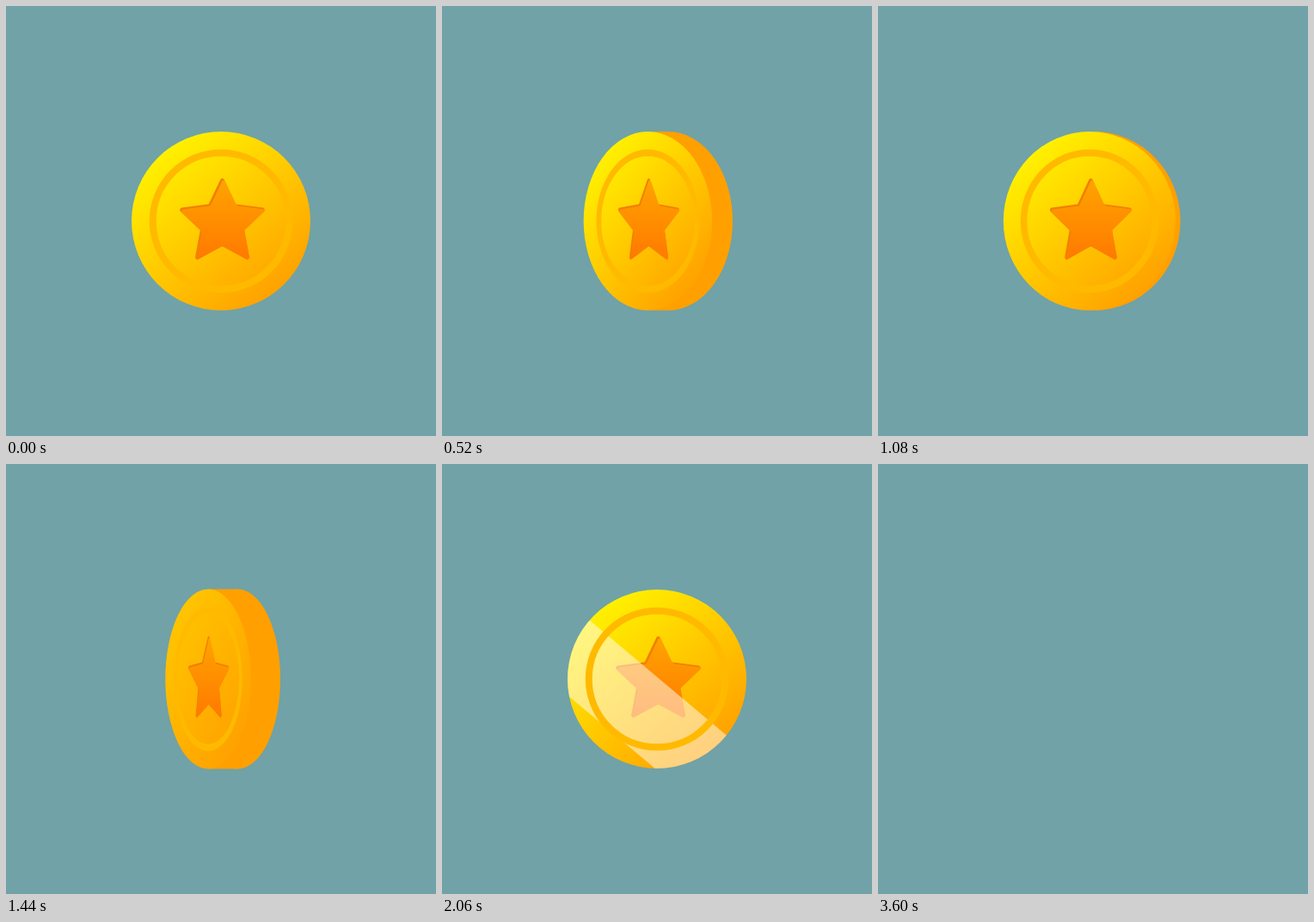
Recreate the animation shown at these times as an HTML page with a canvas. Size 500 by 500 pixels, loop 3.62 s.

```html
<!DOCTYPE html>
<html lang="en">
<head>
<meta charset="utf-8">
<title>Spinning coin</title>
<style>
  html, body { margin: 0; width: 100%; height: 100%; overflow: hidden; background: #70a2a7; }
  canvas { display: block; width: 500px; height: 500px; }
</style>
</head>
<body>
<canvas id="stage" width="500" height="500"></canvas>
<script>
const ctx = document.getElementById('stage').getContext('2d');
const LOOP = 3620, STEP = 20, HIDE = 3600;
const SPIN = 1760, RAMP = 310, TURN = 540;
const SHINE_START = 1900, SHINE_END = 2340, SHINE_WIDTH = 83;
const R = 104, CENTER = 250;
const RING = '#ffba00', EDGE = '#ffa000';

const clamp = v => Math.min(1, Math.max(0, v));

// Constant spin speed with an even ramp up and down
function turnAt(t) {
  if (t >= SPIN) return TURN;
  const speed = TURN / (SPIN - RAMP);
  if (t < RAMP) return speed * t * t / (2 * RAMP);
  const left = SPIN - t;
  if (left < RAMP) return TURN - speed * left * left / (2 * RAMP);
  return speed * (t - RAMP / 2);
}

function gradient(x0, y0, x1, y1, from, to) {
  const g = ctx.createLinearGradient(x0, y0, x1, y1);
  g.addColorStop(0, from);
  g.addColorStop(1, to);
  return g;
}

function makeStar(cx, cy, outer, inner, round) {
  const path = new Path2D();
  const at = i => {
    const a = i * Math.PI / 5 - Math.PI / 2, r = i % 2 ? inner : outer;
    return [cx + r * Math.cos(a), cy + r * Math.sin(a)];
  };
  const [ax, ay] = at(0), [bx, by] = at(1);
  path.moveTo((ax + bx) / 2, (ay + by) / 2);
  for (let i = 1; i <= 10; i++) {
    path.arcTo(...at(i), ...at(i + 1), i % 2 ? 1 : round);
  }
  path.closePath();
  return path;
}

const star = makeStar(1.5, 2.3, 55, 27, 2.5);
const starFill = gradient(0, -50, 0, 45, '#ffa400', '#ff7800');

function disc(x, rx, ry) {
  ctx.beginPath();
  ctx.ellipse(x, CENTER, rx, ry, 0, 0, Math.PI * 2);
  ctx.fill();
}

function drawStar() {
  ctx.save();
  ctx.fillStyle = '#f27f00';
  ctx.fill(star);
  ctx.clip(star);
  ctx.translate(2, 2);
  ctx.fillStyle = starFill;
  ctx.fill(star);
  ctx.restore();
}

function drawShine(t) {
  const p = (t - SHINE_START) / (SHINE_END - SHINE_START);
  if (p <= 0 || p >= 1) return;
  const lead = -R + p * (2 * R + SHINE_WIDTH);
  ctx.save();
  ctx.beginPath();
  ctx.arc(0, 0, R, 0, Math.PI * 2);
  ctx.clip();
  ctx.rotate(40 * Math.PI / 180);
  ctx.fillStyle = 'rgba(255,255,255,.5)';
  ctx.fillRect(-150, -lead, 300, SHINE_WIDTH);
  ctx.restore();
}

function draw(t) {
  ctx.clearRect(0, 0, 500, 500);
  if (t >= HIDE) return;

  const angle = (turnAt(t) % 180) * Math.PI / 180;
  const side = angle < Math.PI / 2 ? 1 : -1;
  const s = Math.sin(angle);
  const c = Math.max(Math.abs(Math.cos(angle)), 0.001);
  const ry = R + 3 * s ** 14;
  const front = CENTER + side * s * (15 + 6 * s ** 8);
  const back = front - side * 42 * s ** 1.55;

  if (s > 0.001) {
    ctx.fillStyle = EDGE;
    disc(back, R * c, ry);
    ctx.fillRect(Math.min(front, back), CENTER - ry, Math.abs(front - back), 2 * ry);
  }

  ctx.save();
  ctx.translate(front, CENTER);
  ctx.scale(c, ry / R);

  // The highlight fades as the face turns away
  const green = Math.round(240 - 44 * clamp((s - 0.7) / 0.17));
  ctx.fillStyle = gradient(-66, -80, 66, 80, `rgb(255,${green},0)`, '#ffa200');
  ctx.beginPath();
  ctx.arc(0, 0, R, 0, Math.PI * 2);
  ctx.fill();

  drawStar();
  drawShine(t);

  ctx.strokeStyle = RING;
  ctx.lineWidth = 8;
  ctx.beginPath();
  ctx.arc(0, 0, 79.3, 0, Math.PI * 2);
  ctx.stroke();
  ctx.restore();
}

const start = performance.now();
function tick() {
  const t = (performance.now() - start) % LOOP;
  draw(Math.floor(t / STEP) * STEP);
  requestAnimationFrame(tick);
}
tick();
</script>
</body>
</html>
```
